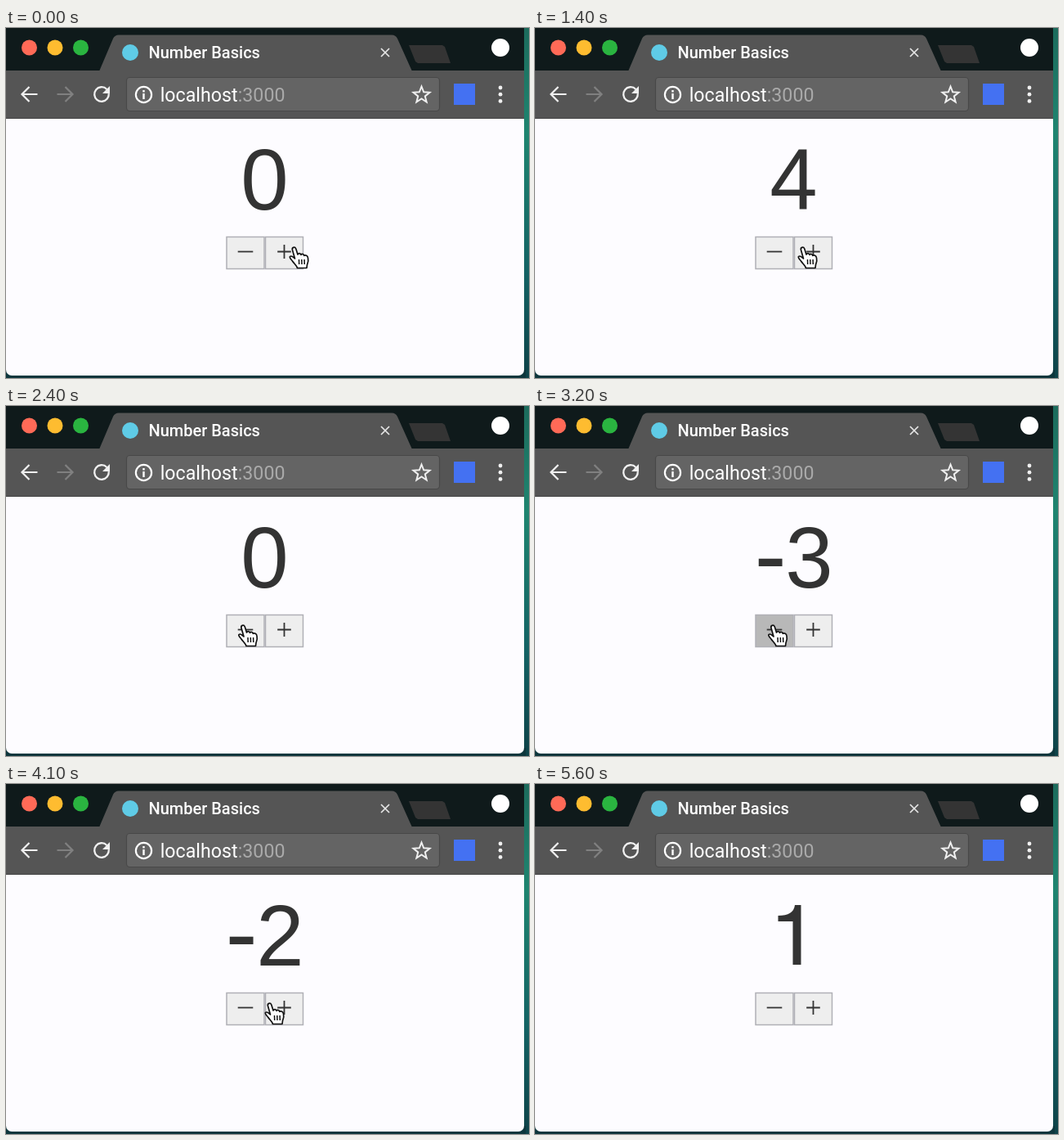
These frames come from a looping animation (640 px wide and 428 px high, 5700 ms). An HTML page with a canvas:

```html
<!DOCTYPE html>
<html lang="en">
<head>
<meta charset="utf-8">
<title>Counter</title>
<style>
html, body { margin: 0; width: 100%; height: 100%; overflow: hidden; background: #0d363c; }
canvas { display: block; width: 640px; height: 428px; }
</style>
</head>
<body>
<canvas id="stage" width="640" height="428"></canvas>
<script>
const ctx = document.getElementById('stage').getContext('2d');
const LOOP = 5700, STEP = 100, PRESS = 100;
const INK = '#333333', BAR = '#555555', STRIP = '#0f1a1b', ICON = '#f0f0f0';

// Times at which each button is released.
const PLUS = [200, 400, 700, 1000, 3800, 4000, 4300, 4600, 4800];
const MINUS = [1800, 2000, 2200, 2400, 2600, 2800, 3100, 3300];

// Pointer stops: time, x, y.
const STOPS = [
  [0, 346.5, 267], [1200, 346.5, 267], [1400, 321.5, 267], [1600, 284, 267],
  [2400, 284, 267], [3200, 285, 267], [3400, 285, 267], [3600, 316.5, 267],
  [4900, 316.5, 267], [5300, 390, -40]
];

function fill(color, draw) {
  ctx.fillStyle = color;
  ctx.beginPath();
  draw();
  ctx.fill();
}

function stroke(color, width, draw) {
  ctx.strokeStyle = color;
  ctx.lineWidth = width;
  ctx.beginPath();
  draw();
  ctx.stroke();
}

function line(...p) {
  ctx.moveTo(p[0], p[1]);
  for (let i = 2; i < p.length; i += 2) ctx.lineTo(p[i], p[i + 1]);
}

function dot(x, y, r, color) {
  fill(color, () => ctx.arc(x, y, r, 0, Math.PI * 2));
}

function text(str, x, y, font, color, align = 'left') {
  ctx.font = font;
  ctx.fillStyle = color;
  ctx.textAlign = align;
  ctx.fillText(str, x, y);
}

function drawDesktop() {
  const g = ctx.createLinearGradient(0, 0, 0, 428);
  g.addColorStop(0, '#1c6b5c');
  g.addColorStop(0.3, '#1f8570');
  g.addColorStop(0.7, '#146264');
  g.addColorStop(1, '#0e4248');
  ctx.fillStyle = g;
  ctx.fillRect(0, 0, 640, 428);
  ctx.fillStyle = '#0d363c';
  ctx.fillRect(0, 418, 636, 10);
}

function drawTabs() {
  ctx.fillStyle = STRIP;
  ctx.fillRect(0, 0, 634, 53);
  dot(28.5, 24, 9.5, '#ff6a57');
  dot(60, 24, 9.5, '#febc30');
  dot(91.5, 24, 9.5, '#2ab440');
  fill(BAR, () => {
    line(114, 53, 131, 13);
    ctx.quadraticCurveTo(133, 8.5, 138, 8.5);
    ctx.lineTo(472, 8.5);
    ctx.quadraticCurveTo(477, 8.5, 479, 13);
    ctx.lineTo(497, 53);
  });
  fill('#343434', () => line(493, 21, 534, 21, 537, 23, 544, 43, 504, 43, 501, 41));
  dot(152, 30, 10, '#5fcbe6');
  text('Number Basics', 174.5, 37, '500 20px Roboto, sans-serif', '#ffffff');
  stroke('#e6e6e6', 1.7, () => {
    line(459, 25, 469, 35);
    line(469, 25, 459, 35);
  });
  dot(605, 24, 11, '#ffffff');
}

function drawArrow(x, dir, color) {
  stroke(color, 2.2, () => {
    line(x - dir * 10, 81, x + dir * 9, 81);
    line(x, 72, x + dir * 9, 81, x, 90);
  });
}

function drawStar(x, y, r) {
  for (let i = 0; i < 10; i++) {
    const a = -Math.PI / 2 + i * Math.PI / 5, d = i % 2 ? r * 0.43 : r;
    ctx.lineTo(x + d * Math.cos(a), y + d * Math.sin(a));
  }
  ctx.closePath();
}

function drawToolbar() {
  ctx.fillStyle = BAR;
  ctx.fillRect(0, 52, 634, 59);
  ctx.fillStyle = '#444444';
  ctx.fillRect(0, 110, 634, 1);
  drawArrow(28.5, -1, ICON);
  drawArrow(72.5, 1, '#808080');

  stroke(ICON, 2.3, () => ctx.arc(117, 81, 8.8, -0.1, Math.PI * 1.76, false));
  fill(ICON, () => line(127, 71, 127, 80, 118, 80));

  const field = () => ctx.roundRect(147.5, 60.5, 383, 41, 4);
  fill('#646464', field);
  stroke('#484848', 1.2, field);
  stroke('#ffffff', 2.2, () => ctx.arc(168.5, 81.5, 9.6, 0, Math.PI * 2));
  ctx.fillStyle = '#ffffff';
  ctx.fillRect(167.3, 80, 2.4, 7);
  ctx.fillRect(167.3, 76, 2.4, 2.5);

  const font = '23.2px Roboto, sans-serif';
  text('localhost', 188.7, 90, font, '#ffffff');
  text(':3000', 188.9 + ctx.measureText('localhost').width, 90, font, '#aaaaaa');

  stroke(ICON, 2, () => drawStar(508.5, 82, 10.5));
  ctx.fillStyle = '#4471f2';
  ctx.fillRect(548, 68, 26, 26);
  for (const y of [73, 81.2, 89.4]) dot(605, y, 2.4, ICON);
}

function drawPage() {
  fill('#fdfcff', () => ctx.roundRect(0, 111, 634, 314, [0, 0, 7, 7]));
}

function drawDigit(n, x) {
  if (n !== 1) {
    text(n, x, 222, '105px "Liberation Sans", Arial, sans-serif', INK, 'center');
    return;
  }
  // A plain one without a foot.
  fill(INK, () => {
    line(x + 9, 148, x + 9, 221, x - 1, 221, x - 1, 168, x - 19, 168, x - 19, 161);
    ctx.quadraticCurveTo(x, 161, x + 1.5, 148);
  });
}

function drawCount(n) {
  if (n < 0) text('-', 268.5, 222.5, '118px "Liberation Sans", Arial, sans-serif', INK);
  drawDigit(Math.abs(n), n < 0 ? 335.5 : 316.5);
}

function drawButton(x, pressed, plus) {
  ctx.fillStyle = pressed ? '#b8b8b8' : '#eeeeee';
  ctx.fillRect(x, 255.5, 46, 39);
  ctx.strokeStyle = '#b0b0b6';
  ctx.lineWidth = 1.5;
  ctx.strokeRect(x, 255.5, 46, 39);
  const c = x + 23, h = plus ? 8.3 : 9.3;
  stroke(INK, 1.8, () => {
    line(c - h, 273.5, c + h, 273.5);
    if (plus) line(c, 265, c, 282);
  });
}

function drawHand(x, y) {
  ctx.save();
  ctx.translate(x, y);
  const hand = new Path2D('M4 4.5C3 1 7 0 8.3 3L10.5 10C11 8 14 8 14.5 10.3' +
    'C15.5 8.8 18 9.4 18.3 11.3C20 10.3 22.5 11.5 23 14C24 18 23 20 22 22.5' +
    'L21.5 26.5L10 26.5C9.5 24 6 21 4 18C2.5 16 0 14 1 12.5C2.5 11 5 13 7 15Z');
  ctx.lineJoin = 'round';
  ctx.fillStyle = '#fff';
  ctx.fill(hand);
  ctx.strokeStyle = '#111111';
  ctx.lineWidth = 1.7;
  ctx.stroke(hand);
  stroke('#111111', 1.5, () => {
    for (const lx of [12, 15.3, 18.6]) line(lx, 16, lx + 0.2, 22);
  });
  ctx.restore();
}

function pointerAt(t) {
  const i = STOPS.findIndex(s => s[0] > t);
  if (i < 0) return null;
  const [t0, x0, y0] = STOPS[i - 1], [t1, x1, y1] = STOPS[i];
  const k = (t - t0) / (t1 - t0);
  return [x0 + (x1 - x0) * k, y0 + (y1 - y0) * k];
}

const done = (clicks, t) => clicks.filter(c => c <= t).length;
const held = (clicks, t) => clicks.some(c => t >= c - PRESS && t < c);

function render(t) {
  drawDesktop();
  drawTabs();
  drawToolbar();
  drawPage();
  drawCount(done(PLUS, t) - done(MINUS, t));
  drawButton(270, held(MINUS, t), false);
  drawButton(317.5, held(PLUS, t), true);
  const p = pointerAt(t);
  if (p) drawHand(...p);
}

const start = performance.now();
function tick() {
  const t = (performance.now() - start) % LOOP;
  render(Math.floor(t / STEP) * STEP);
  requestAnimationFrame(tick);
}
tick();
</script>
</body>
</html>
```
